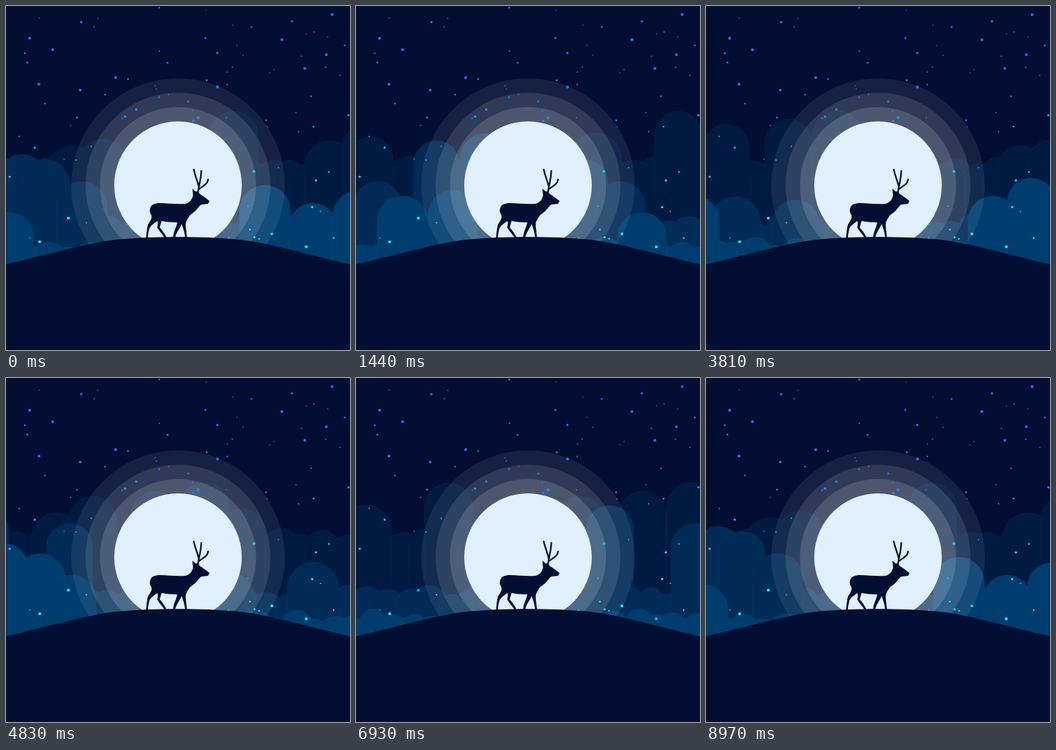
Recreate the animation shown at these times as an HTML page. Size 480 by 480 pixels, loop 9000 ms.

```html
<!DOCTYPE html>
<html lang="en">
<head>
<meta charset="utf-8">
<title>Deer in the moonlight</title>
<style>
html, body { margin: 0; width: 100%; height: 100%; overflow: hidden; background: #020f32; }
svg { display: block; width: 100vw; height: 100vh; }
.drift { animation: drift 9s linear infinite; stroke: #5fb4e0; stroke-opacity: .06; }
.star { animation: twinkle 9s linear infinite; }
@keyframes drift { to { transform: translateX(var(--span)); } }
@keyframes twinkle { 0%, 96%, 100% { opacity: 1; } 98% { opacity: .65; } }
</style>
</head>
<body>
<svg viewBox="0 0 480 480">
  <rect width="480" height="480" fill="#020f32"/>
  <g id="clouds"></g>
  <g fill="#fff">
    <circle cx="240" cy="250" r="149" fill-opacity=".08"/>
    <circle cx="240" cy="250" r="129" fill-opacity=".11"/>
    <circle cx="240" cy="250" r="109" fill-opacity=".14"/>
  </g>
  <g id="stars"></g>
  <circle cx="240" cy="250" r="89" fill="#e0f0ff"/>
  <g fill="#020f32">
    <path d="M0 360.5C60 346.5 110 331.5 150 326.5C180 323 215 322.2 240 322.2C265 322.2 300 323 330 326.5C370 331.5 420 346.5 480 360.5V480H0Z"/>
    <path d="M201 283C202 277 208 275 215 275C226 275 238 277 250 276C256 275 260 270 261 264L260 255L265 259L268 258L270 262L276 266L284 272L282 276L273 277C270 278 268 282 266 284C263 288 258 290 256 293C254 296 252 299 251 302C250 307 252 314 252.5 323L250 323C249 315 247 309 245 304C243 310 238 315 236 323L233 323C234 314 238 308 239 302C231 302 223 301 217 300C216 304 215 307 214.5 309C218 313 221 317 224 323L221 323C217 317 213 313 211 309C212 305 212 301 211 300C206 304 201 307 200 311C199 315 198 319 198 323L195.5 323C196 316 197 309 198 305C201 300 204 297 203 292C201 289 200 286 201 283Z"/>
    <path fill="none" stroke="#020f32" stroke-width="2.2" stroke-linecap="round" d="M268 260C269 250 272 243 272.5 230M269 252C267 243 264 238 262 228M270 255C276 250 281 249 282 242"/>
  </g>
</svg>
<script>
const NS = 'http://www.w3.org/2000/svg';

function add(parent, tag, attrs) {
  const el = document.createElementNS(NS, tag);
  for (const key in attrs) el.setAttribute(key, attrs[key]);
  return parent.appendChild(el);
}

function seeded(seed) {
  return () => (seed = (seed * 16807) % 2147483647) / 2147483647;
}

// Peaks are the tall clouds as [x, top]; low puffs fill the bank between them.
// Each layer travels its full span once per loop.
const layers = [
  { fill: '#001a42', span: 822, low: 208, peaks: [
    [92, 195], [135, 186], [203, 177], [318, 147], [452, 188],
    [502, 165], [589, 158], [657, 146], [710, 183]
  ] },
  { fill: '#002c57', span: 1644, low: 288, peaks: [
    [22, 207], [55, 214], [106, 245], [583, 247], [666, 188], [732, 178], [850, 203],
    [988, 266], [1073, 271], [1190, 257], [1411, 245], [1493, 188], [1561, 178]
  ] },
  { fill: '#003d6f', span: 2466, low: 322, peaks: [
    [4, 288], [361, 250], [428, 275], [490, 258], [825, 288], [1140, 231], [1190, 245],
    [1234, 275], [1405, 264], [1822, 265], [1875, 240], [2136, 265], [2206, 257]
  ] }
];

function drawLayer({ fill, span, low, peaks }, index) {
  const random = seeded(71 + index);
  const sky = document.getElementById('clouds');
  const strip = add(sky, 'g', { class: 'drift', fill, style: `--span:${span}px` });

  function puff(x, top, r) {
    for (const left of [x - r, x - r - span]) {
      add(strip, 'rect', { x: left, y: top, width: 2 * r, height: 420 - top, rx: r });
    }
  }

  for (let x = 0; x < span; x += 28) {
    puff(x + 10 * random(), low + 14 * random(), 18 + 10 * random());
  }
  for (const [x, top] of peaks) puff(x, top, 32 + 4 * random());
}
layers.forEach(drawLayer);

const starBox = document.getElementById('stars');
const random = seeded(2024);

function star(cx, cy, r) {
  const k = Math.max(0, Math.min(1, (cy - 100) / 190));
  const fill = `rgb(${Math.round(35 * (1 - k))},${Math.round(105 + 140 * k)},255)`;
  const style = `animation-delay:${-Math.round(9000 * random())}ms`;
  add(starBox, 'circle', { cx, cy, r, fill, style, class: 'star' });
}

const bright = [
  [33, 45], [65, 61], [46, 109], [385, 47], [417, 87], [447, 68], [455, 12], [295, 113],
  [153, 100], [268, 156], [87, 296], [47, 329], [346, 231], [371, 318], [419, 336]
];
for (const [x, y] of bright) star(x, y, 2.1);
for (let i = 0; i < 85; i++) star(480 * random(), 335 * random(), 0.8 + random() ** 2);
</script>
</body>
</html>
```
